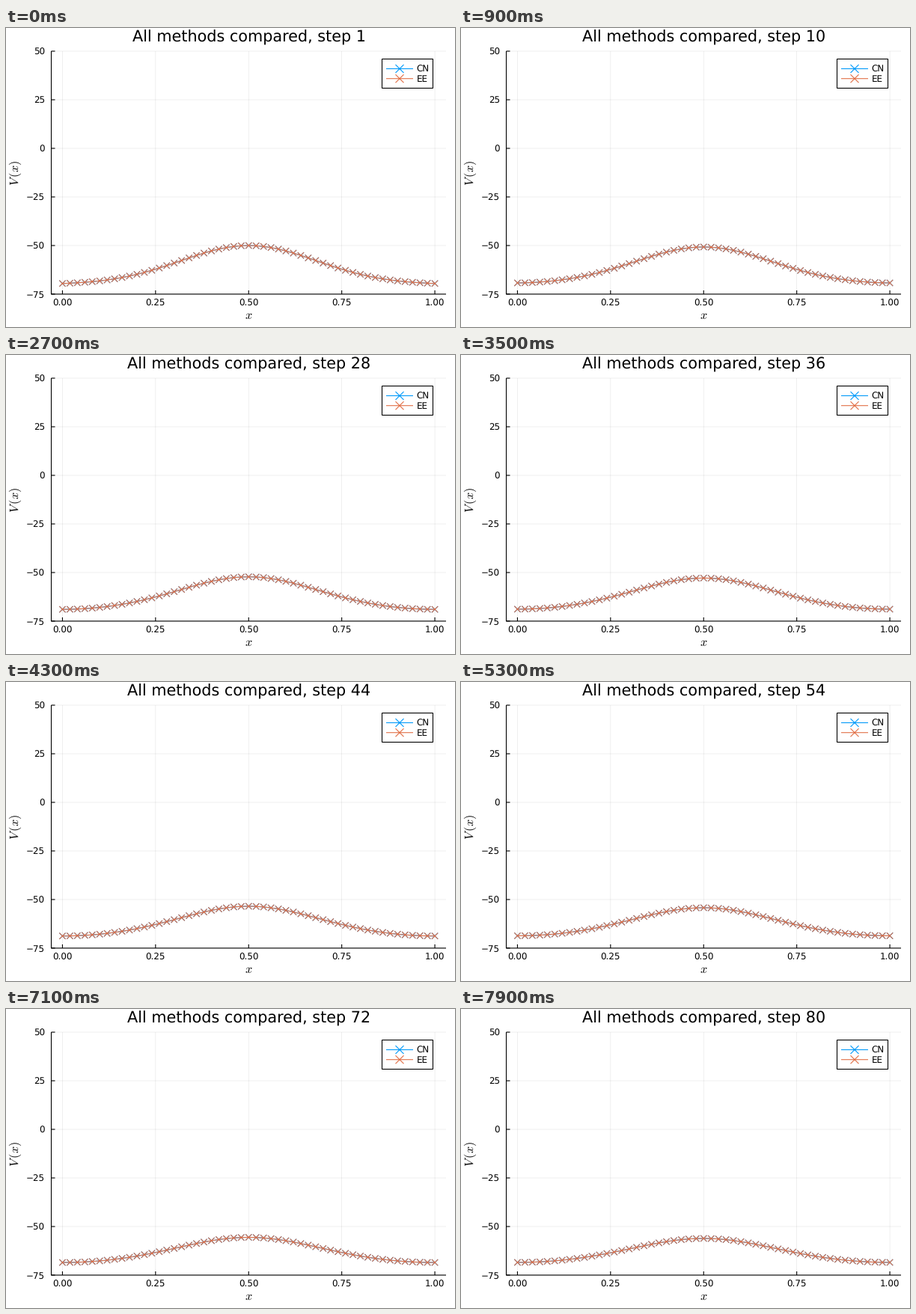
A matplotlib script for the animation above (8000 ms loop, 600 by 400 pixels).

```python
import numpy as np
import matplotlib.pyplot as plt
from matplotlib.animation import FuncAnimation
from matplotlib.patches import Rectangle

plt.rcParams.update({
    "font.family": "DejaVu Sans",
    "mathtext.fontset": "cm",
    "text.hinting": "none",
    "path.simplify": False,
})

W, H, DPI = 600, 400, 100
STEPS, INTERVAL = 80, 100
BLUE, ORANGE = "#009AFA", "#E26F46"
LEFT, RIGHT, TOP, BOTTOM = 60.5, 588, 31, 356


def pt(px):
    return px * 72 / DPI


def px_x(x):
    return LEFT + (np.asarray(x) + 0.03) / 1.06 * (RIGHT - LEFT)


def px_y(v):
    return TOP + (50 - np.asarray(v)) / 125 * (BOTTOM - TOP)


def solve(n=51, rest=-70.0, threshold=26.0, top=110.0,
          diffusion=9.8e-5, rate=0.0064):
    """Diffusion with a cubic reaction and sealed ends, one row per step."""
    x = np.linspace(0, 1, n)
    r = diffusion / (x[1] - x[0]) ** 2
    u = 20 * np.exp(-15 * (x - 0.5) ** 2)
    rows = []
    for _ in range(STEPS):
        rows.append(rest + u)
        p = np.pad(u, 1, mode="reflect")
        react = rate * u * (1 - u / threshold) * (1 - u / top)
        u = u + r * (p[2:] - 2 * u + p[:-2]) - react
    return x, rows


fig = plt.figure(figsize=(W / DPI, H / DPI), dpi=DPI, facecolor="white")
ax = fig.add_axes([0, 0, 1, 1])
ax.set(xlim=(0, W), ylim=(H, 0))
ax.axis("off")


def line(xs, ys, color="black", width=1.1, **kw):
    return ax.plot(xs, ys, color=color, lw=pt(width), snap=False,
                   solid_capstyle="butt", **kw)[0]


def label(x, y, s, size=11.9, **kw):
    return ax.text(x, y, s, fontsize=pt(size), **kw)


def cross_path(xs, ys, size):
    """Diagonal strokes around each point, separated by gaps."""
    h = size / 2
    dx = np.array([-h, h, np.nan, -h, h, np.nan])
    dy = np.array([-h, h, np.nan, h, -h, np.nan])
    return np.add.outer(xs, dx).ravel(), np.add.outer(ys, dy).ravel()


# Grid, ticks and axes
for t in (0, 0.25, 0.5, 0.75, 1):
    x = px_x(t)
    line([x, x], [TOP, BOTTOM], width=0.6, alpha=0.1)
    line([x, x], [BOTTOM, BOTTOM - 5])
    label(x, 371.5, f"{t:.2f}", ha="center")
for v in range(-75, 51, 25):
    y = px_y(v)
    line([LEFT, RIGHT], [y, y], width=0.6, alpha=0.1)
    line([LEFT, LEFT + 5], [y, y])
    label(52, y + 4.4, str(v).replace("-", "\u2212"), ha="right")
line([LEFT, LEFT, RIGHT], [TOP, BOTTOM, BOTTOM])

label(324.3, 389, "$x$", 16.3, ha="center")
label(12.5, 193.8, r"$V\,(x)$", 16.3, rotation=90, ha="center", va="center")
title = label(324.5, 18.6, "", 20.8, ha="center")

# Both series share the same values; the second covers the first
grid, volts = solve()
xs = px_x(grid)
MARK = 8.3
curves = []
for color in (BLUE, ORANGE):
    ys = px_y(volts[0])
    curves.append((line(xs, ys, color), line(*cross_path(xs, ys, MARK), color)))

# Legend
ax.add_patch(Rectangle((502.5, 41.5), 68, 39, fc="white", ec="black",
                       lw=pt(1.1), snap=False, zorder=3))
for name, color, y in (("CN", BLUE, 54.5), ("EE", ORANGE, 67.7)):
    line([508, 544], [y, y], color, zorder=4)
    line(*cross_path([526], [y], 11), color, zorder=4)
    label(548.7, y + 4.4, name, zorder=4)


def draw(i):
    title.set_text(f"All methods compared, step {i + 1}")
    ys = px_y(volts[i])
    for curve, marks in curves:
        curve.set_ydata(ys)
        marks.set_ydata(cross_path(xs, ys, MARK)[1])
    return [title]


anim = FuncAnimation(fig, draw, frames=STEPS, interval=INTERVAL,
                     repeat=True, repeat_delay=0, blit=False)
plt.show()
```
